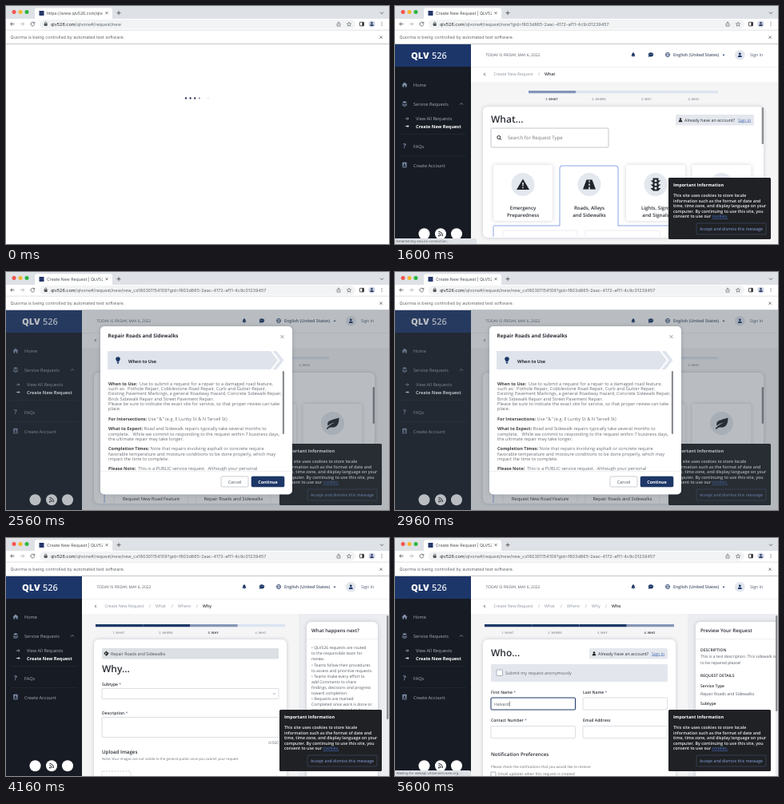
An HTML page with a canvas that plays this animation: 479 by 298 pixels, repeating every 5680 ms.

```html
<!DOCTYPE html>
<html lang="en">
<head>
<meta charset="utf-8">
<title>Create New Request</title>
<style>
html, body { margin: 0; width: 100%; height: 100%; overflow: hidden; background: #fff; }
canvas { display: block; width: 479px; height: 298px; }
</style>
</head>
<body>
<canvas id="stage"></canvas>
<script>
const canvas = document.getElementById('stage');
const ctx = canvas.getContext('2d');
const dpr = window.devicePixelRatio || 1;
canvas.width = 479 * dpr;
canvas.height = 298 * dpr;

const LOOP = 5680, STEP = 80;
const NAVY = '#1c3766', INK = '#2b2f36', GREY = '#6b7077', PALE = '#dfe4ec', BLUE = '#4a6cb3';
const UI = 'Inter, sans-serif', SITE = '"Open Sans", sans-serif';
const TYPE = 'Repair Roads and Sidewalks';

// Drawing helpers
function text(s, x, y, size, color = INK, weight = 400, align = 'left', family = SITE) {
  ctx.font = `${weight} ${size}px ${family}`;
  ctx.textAlign = align;
  ctx.fillStyle = color;
  ctx.fillText(s, x, y);
  return ctx.measureText(s).width;
}
function lines(list, x, y, pitch, size, color, weight) {
  list.forEach((s, i) => text(s, x, y + i * pitch, size, color, weight));
}
function box(x, y, w, h, r, fill, stroke, width = 0.6) {
  ctx.beginPath();
  ctx.roundRect(x, y, w, h, r);
  if (fill) { ctx.fillStyle = fill; ctx.fill(); }
  if (stroke) { ctx.strokeStyle = stroke; ctx.lineWidth = width; ctx.stroke(); }
}
function disc(x, y, r, fill) { box(x - r, y - r, 2 * r, 2 * r, r, fill); }
function path(d, x, y, fill, stroke, width = 0.8) {
  const p = new Path2D(d);
  ctx.save();
  ctx.translate(x, y);
  if (fill) { ctx.fillStyle = fill; ctx.fill(p, 'evenodd'); }
  if (stroke) { ctx.strokeStyle = stroke; ctx.lineWidth = width; ctx.stroke(p); }
  ctx.restore();
}
function card(x, y, w, h, r = 6) {
  ctx.save();
  ctx.shadowColor = 'rgba(40,50,70,.22)';
  ctx.shadowBlur = 5 * dpr;
  box(x, y, w, h, r, '#fff');
  ctx.restore();
}
function clipped(x, y, w, h, draw) {
  ctx.save();
  ctx.beginPath();
  ctx.rect(x, y, w, h);
  ctx.clip();
  draw();
  ctx.restore();
}
function underlined(s, x, y, size, color = BLUE) {
  const w = text(s, x, y, size, color);
  box(x, y + 0.8, w, 0.5, 0, color);
}
const cross = (x, y, r, c) => path(`M-${r}-${r}L${r} ${r}M${r}-${r}L-${r} ${r}`, x, y, null, c, 0.7);
function person(x, y, c, k = 1) {
  disc(x, y - 1.2 * k, 1.3 * k, c);
  box(x - 2.2 * k, y + 0.4 * k, 4.4 * k, 2.2 * k, [1.4 * k, 1.4 * k, 0, 0], c);
}
function button(s, x, y, w, h, fill, stroke, color, weight = 600) {
  box(x, y, w, h, 1.5, fill, stroke);
  text(s, x + w / 2, y + h / 2 + 2, 5.4, color, weight, 'center');
}

// Time helpers
const ramp = (t, a, b) => Math.min(1, Math.max(0, (t - a) / (b - a)));
const ease = k => k * k * (3 - 2 * k);
const typed = (s, t, a, b) => s.slice(0, Math.round(s.length * ramp(t, a, b)));

function browser(t) {
  box(0, 0, 479, 16, 0, '#dee1e6');
  ['#f4554d', '#f5b52e', '#2bb640'].forEach((c, i) => disc(10 + 8 * i, 7.5, 2.5, c));
  box(36, 2.5, 97, 14, [3, 3, 0, 0], '#fff');
  box(41.5, 6, 6, 6, 0, '#25376b');
  const title = t < 800 ? 'https://www.qlv526.com/qlvone' : 'Create New Request | QLV526';
  clipped(50, 3, 71, 12, () => text(title, 51, 10.7, 5.2, '#45494d', 400, 'left', UI));
  cross(126, 8.7, 1.5, '#444');
  path('M-2.5 0H2.5M0-2.5V2.5', 141, 8.7, null, '#444');
  path('M-2-1L0 1L2-1', 470, 8.7, null, '#444');

  box(0, 16, 479, 32, 0, '#fff');
  path('M2.5 0H-2.3M0-2.3L-2.3 0L0 2.3', 8, 22.5, null, '#55595e');
  path('M-2.5 0H2.3M0-2.3L2.3 0L0 2.3', 20.5, 22.5, null, '#b0b3b7');
  path('M2 -1.3A2.4 2.4 0 1 0 2.4 .5M2.5-2.7V-.8H.6', 33.3, 22.5, null, '#55595e');
  box(42, 17, 395, 11.5, 5.7, '#f1f3f4');
  box(47.7, 21.8, 4, 3.2, 0.4, '#55595e');
  path('M-1.1 0V-1A1.1 1.1 0 0 1 1.1-1V0', 49.7, 22, null, '#55595e', 0.7);
  let route = '/qlvone#/request/new';
  if (t >= 2240) route += '/new_cs180301154109';
  if (t >= 800) route += '?gid=f803d865-2aac-4172-af11-4c9c01239457';
  const host = text('qlv526.com', 56, 24.5, 5.5, '#25282c', 400, 'left', UI);
  text(route, 56 + host, 24.5, 5.5, '#63676c', 400, 'left', UI);
  path('M-1.2-.8H-2V2.5H2V-.8H1.2M0 1V-2.8M-1.2-1.6L0-2.8L1.2-1.6', 416, 22.7, null, '#55595e', 0.6);
  path('M0-2.7L.8-.9L2.7-.8L1.2.5L1.7 2.4L0 1.3L-1.7 2.4L-1.2.5L-2.7-.8L-.8-.9Z', 429, 22.8, null, '#55595e', 0.6);
  box(442.5, 20.3, 5, 4.6, 0.3, null, '#333', 0.8);
  box(445.3, 20.3, 2.2, 4.6, 0, '#333');
  disc(457.5, 22.5, 4, '#cdd3e6');
  person(457.5, 22.5, '#334263');
  [-2, 0, 2].forEach(d => disc(470, 22.5 + d, 0.6, '#55595e'));
  box(0, 29.7, 479, 0.7, 0, '#d5d7da');
  text('Quorma is being controlled by automated test software.', 5.5, 41.3, 5.45, '#63676c', 400, 'left', UI);
  cross(469, 39.2, 1.6, '#444');
  box(0, 47, 479, 1, 0, '#c3c5c8');
}

function loader(t) {
  for (let i = 0; i < 6; i++) {
    const wave = Math.cos(2 * Math.PI * ((i - 1.2) / 6 - t / 640));
    ctx.globalAlpha = Math.min(1, Math.max(0, 0.75 + wave));
    disc(225 + 5.6 * i, 115.5, 1.15, '#1d2350');
  }
  ctx.globalAlpha = 1;
}

function sidebar() {
  const soft = '#a3acb9', dark = '#171c24';
  box(0, 48, 95, 250, 0, dark);
  box(0, 48, 95, 28, 0, '#1d366a');
  text('QLV', 20, 66, 11, '#fff', 800);
  text('526', 46, 66, 11, '#e4e9f2', 600);
  path('M-3.5 .3L0-3L3.5 .3L2.6 .3V3H.8V1H-.8V3H-2.6V.3Z', 12, 98.5, '#8190ab');
  text('Home', 23, 100.7, 5.6, soft);
  path('M-3-1.6L0-3L3-1.6L0-.2ZM-3 .1L0 1.5L3 .1V1L0 2.4L-3 1ZM-3 1.8L0 3.2L3 1.8V2.5L0 4L-3 2.5Z', 12, 122, '#8190ab');
  text('Service Requests', 23, 124.7, 5.6, soft);
  path('M-2 1L0-1L2 1', 83, 122.5, null, soft, 0.7);
  [[141, soft], [150.5, '#fff']].forEach(([y, c]) => path('M-2 0H2M.5-1.5L2 0L.5 1.5', 15, y, null, c));
  text('View All Requests', 26, 143, 5.6, soft);
  text('Create New Request', 26, 152.5, 5.6, '#fff', 700);
  box(6, 160.5, 83, 0.5, 0, '#2a303a');
  text('?', 12, 178.3, 8, '#8190ab', 700, 'center');
  text('FAQs', 23, 177.5, 5.6, soft);
  box(6, 187, 83, 0.5, 0, '#2a303a');
  box(9.3, 195.7, 5.2, 6.6, 0.6, '#8190ab');
  person(11.9, 199.2, dark, 0.8);
  text('Create Account', 23, 201.5, 5.6, soft);
  [36.5, 57, 77].forEach(x => disc(x, 285.3, 7, '#fff'));
  disc(55, 287.5, 0.9, dark);
  path('M-2-.6A2.8 2.8 0 0 1 .8 2.8M-2-2.8A5 5 0 0 1 3 2.8', 56.4, 285.2, null, dark, 1);
}

function header(crumbs) {
  box(95, 48, 384, 47, 0, '#fff');
  box(95, 76, 384, 0.6, 0, '#e4e6ea');
  text('TODAY IS FRIDAY, MAY 6, 2022', 113.5, 63.2, 4.9, '#555b64');
  path('M-2.6 1.8C-1.4 .6-2-2.6 0-2.8C2-2.6 1.4 .6 2.6 1.8ZM-.8 2.3H.8L0 3.2Z', 298, 61, NAVY);
  path('M-3.2-.3A3.2 2.6 0 1 1-1.2 2.2L-3.2 3L-2.6 1.3Z', 320, 61, NAVY);
  [-1.4, 0, 1.4].forEach(d => disc(320 + d, 60.7, 0.4, '#fff'));
  path('M-2.7 0A2.7 2.7 0 1 0 2.7 0A2.7 2.7 0 1 0-2.7 0M-2.7 0H2.7M0-2.7C-1.8-1-1.8 1 0 2.7C1.8 1 1.8-1 0-2.7', 341, 61, null, NAVY, 0.6);
  text('English (United States)', 348, 63.2, 5.3, '#46536a', 600);
  path('M-1.5-.7H1.5L0 1Z', 411, 61.5, NAVY);
  disc(431.3, 61.3, 6.3, '#e2e6ee');
  person(431.3, 61.2, NAVY, 1.1);
  text('Sign In', 444, 63.2, 5.2, '#46536a');
  path('M.8-1.6L-.8 0L.8 1.6', 112, 85.5, null, '#333');
  const starts = [123.5, 187, 215, 246, 271];
  ['Create New Request', 'What', 'Where', 'Why', 'Who'].slice(0, crumbs).forEach((s, i) => {
    const last = i === crumbs - 1;
    text(s, starts[i], 87.3, 5.2, last ? INK : '#8b929c', last ? 600 : 400);
    if (!last) text('/', starts[i + 1] - 8, 87.3, 5.2, '#8b929c');
  });
}

function progress(x, y, current) {
  const w = 59.25;
  ['1. WHAT', '2. WHERE', '3. WHY', '4. WHO'].forEach((s, i) => {
    box(x + i * w, y, w, 3.2, 0, i < current ? NAVY : i === current ? '#8495b7' : '#dce4ef');
    text(s, x + (i + 0.5) * w - 1, y + 11.5, 3.9, i === current ? INK : GREY, i === current ? 600 : 400, 'center');
  });
}

const heading = (s, y) => text(s, 120, y, 12, INK, 600);

function account(x, y) {
  box(x, y, 98, 13.5, 1.5, '#e4e7ed');
  person(x + 6, y + 6.7, '#222');
  text('Already have an account?', x + 11, y + 8.7, 5.35, INK);
  underlined('Sign In', x + 78, y + 8.7, 5.2);
}

function typeTag(x, y, w) {
  box(x, y, w, 13.5, 1.5, '#dcdfe4');
  path('M0-3.2L3.2 0L0 3.2L-3.2 0Z', x + 5.5, y + 6.6, '#222');
  path('M-1 1.2V-.4H1', x + 5.5, y + 6.6, null, '#fff', 0.7);
  text(TYPE, x + 11, y + 8.6, 5.25, '#444b55');
}

const categories = [
  [160, 'Emergency', 'Preparedness', 'M0-7L8 6.5H-8ZM-.9-2.4H.9L.5 2.2H-.5ZM-.8 3.2H.8V4.8H-.8Z'],
  [243, 'Roads, Alleys', 'and Sidewalks', 'M-3.5-6H3.5L8 6H-8ZM-.6-5H.6V-2.5H-.6ZM-.7-1H.7V1.5H-.7ZM-.8 3H.8V6H-.8Z'],
  [326, 'Lights, Signs', 'and Signals', 'M-3.5-8H3.5L3.5-5H6.5L3.5-2.5V0H6.5L3.5 2.5V4.5H6.5L3 8H-3L-6.5 4.5H-3.5V2.5L-6.5 0H-3.5V-2.5L-6.5-5H-3.5ZM-1.4-6H1.4V-3.2H-1.4ZM-1.4-1.4H1.4V1.4H-1.4ZM-1.4 3.2H1.4V6H-1.4Z'],
  [408.5, '', '', 'M8-7C8 3 4 5.5-2 5L-4 5.3L-6.8 7.5L-7.8 6.5C-5 3-2 1 3-1C-2 0-4 1.5-6 3C-8-4-1-4 8-7Z']
];

function whatPage(t) {
  header(2);
  progress(167, 106, 0);
  const open = t >= 1440, scroll = 34 * ease(ramp(t, 1760, 2080));
  card(110, 126, 351, 164);
  clipped(110, 126, 351, 163, () => {
    ctx.translate(0, -scroll);
    heading('What...', 146.3);
    account(351, 136);
    box(120, 153, 147, 24, 1.5, '#fff', '#9da2ab');
    path('M-2.2 0A2 2 0 1 0 1.8 0A2 2 0 1 0-2.2 0M1.2 1.4L3 3.2', 130, 164.5, null, '#222', 1);
    text('Search for Request Type', 141, 167.2, 6.1, '#777');
    if (open) {
      box(123, 275, 323, 90, 1.5, '#fff', '#6f8ee0', 0.8);
      ['Request New Road Feature', TYPE, ''].forEach((s, i) => {
        const x = 135 + 103 * i;
        box(x, 281, 93, 47, 1.5, '#fff', '#d9dde4');
        disc(x + 46.5, 303, 10, '#e8ecf1');
        text(s, x + 46.5, 319.8, 5.7, INK, 400, 'center');
      });
    }
    categories.forEach(([x, top, bottom, icon], i) => {
      if (open && i === 1) {
        box(x - 37, 200, 73, 76, [3, 3, 0, 0], '#fff');
        path('M0 75.3V3Q0 0 3 0H70Q73 0 73 3V75.3', x - 37, 200, null, '#6f8ee0');
      } else card(x - 37, 199, 74, 70, 2);
      disc(x, 223.5, 14.5, '#e3e7ee');
      path(icon, x, 223.5, '#20242a');
      text(top, x, 255, 6.1, INK, 600, 'center');
      text(bottom, x, 263.5, 6.1, INK, 600, 'center');
    });
  });
  box(458.7, 127 + scroll * 0.5, 2.3, 46, 1, '#8a8d91');
}

const help = [
  [0, 'When to Use:', '  Use to submit a request for a repair to a damaged road feature,'],
  [1, '', 'such as:  Pothole Repair, Cobblestone Road Repair, Curb and Gutter Repair,'],
  [2, '', 'Existing Pavement Markings, a general Roadway Hazard, Concrete Sidewalk Repair,'],
  [3, '', 'Brick Sidewalk Repair and Street Pavement Repair.'],
  [4, '', 'Please be sure to indicate the exact site for service, so that proper review can take'],
  [5, '', 'place.'],
  [7, 'For Intersections:', ' Use "&" (e.g. E Lunby St & N Tarvell St)'],
  [9, 'What to Expect:', ' Road and Sidewalk repairs typically take several months to'],
  [10, '', 'complete.   While we commit to responding to the request within 7 business days,'],
  [11, '', 'the ultimate repair may take longer.'],
  [13, 'Completion Times:', ' Note that repairs involving asphalt or concrete require'],
  [14, '', 'favorable temperature and moisture conditions to be done properly, which may'],
  [15, '', 'impact the time to complete.'],
  [17, 'Please Note:', '  This is a PUBLIC service request.  Although your personal']
];

function modal() {
  ctx.fillStyle = 'rgba(55,68,78,.35)';
  ctx.fillRect(0, 48, 479, 250);
  card(118, 68, 240, 210.5, 5);
  text(TYPE, 127.5, 82, 6.35, INK, 700);
  cross(345.5, 81, 2, '#777');
  path('M0 0H204L213 11.5L204 23H0Z', 127, 99, PALE);
  path('M206.5 0H211.5L220.5 11.5L211.5 23H206.5L215.5 11.5Z', 127, 99, PALE);
  path('M-1.3 2C-1.3 .8-2.8 .2-2.8-1.4A2.8 2.8 0 0 1 2.8-1.4C2.8 .2 1.3 .8 1.3 2ZM-1.2 2.6H1.2V3.6L0 4.5L-1.2 3.6Z', 140, 110.5, NAVY);
  text('When to Use', 153, 113.6, 5.6, INK, 700);
  clipped(118, 124, 240, 125, () => help.forEach(([row, strong, rest]) => {
    const y = 141.8 + row * 6.27;
    const w = strong ? text(strong, 128, y, 5.5, '#444', 700) : 0;
    text(rest, 128 + w, y, 5.65, '#6a6f76');
  }));
  box(345.8, 124, 2.2, 79, 1, '#8a8d91');
  box(118, 249.5, 240, 0.6, 0, '#dcdfe4');
  button('Cancel', 269, 256, 34, 13, '#fff', '#a4abb8', '#4c5564', 400);
  button('Continue', 307, 256, 41, 13, NAVY, NAVY, '#fff', 700);
}

function wherePage() {
  header(3);
  card(110, 105, 134, 126);
  typeTag(120, 115, 114.5);
  heading('Where...', 145.4);
  lines(['Click on the map to place a pin or search by the', 'closest address to the request location.'], 120, 154.8, 7, 4.85, GREY);
  box(120, 170, 114.5, 16, 1.5, '#fff', '#cfd3d9');
  path('M0 3C-2.6 0-2-2.8 0-2.8C2-2.8 2.6 0 0 3ZM-.8-.8H.8V.6H-.8Z', 127, 178, '#222');
  text('Start new or search existing...', 135.5, 180, 5.15, '#9a9ea4');
  underlined('Use my current location', 120, 198.2, 5.15);
  button('Search', 199, 190, 35.5, 13, '#fff', '#94a0b8', '#3c465a');
  button('Back', 158, 209, 31.5, 13, '#fff', '#94a0b8', '#3c465a');
  button('Continue', 193, 209, 41.5, 13, '#e2e3e5', null, '#b3b6bb', 400);
}

function label(s, x, y, required = true) {
  const w = text(s, x, y, 5.1, INK, 600);
  if (required) text(' *', x + w, y, 5.1, '#6d7da0', 600);
}
function select(name, y, value, focus) {
  label(name, 120, y);
  box(120, y + 3.5, 221, 13, 1, '#fff', focus ? NAVY : '#c3c8d0', focus ? 0.9 : 0.6);
  text(value, 123.5, y + 12, 5.4, '#666b72');
  path('M-1.8-.9L0 .9L1.8-.9', 335.5, y + 10, null, '#777', 0.6);
}

const nextSteps = ['• QLV526 requests are routed', 'to the responsible team for', 'review.',
  '• Teams follow their procedures', 'to assess and prioritize requests.',
  '• Teams make every effort to', 'add Comments to share', 'findings, decisions and progress', 'toward completion.',
  '• Requests are marked', 'Completed once work is done or', 'request is determined to be a',
  'duplicate of another request.', 'The responsible team will add'];

function whyPage(t) {
  const chosen = t >= 4240;
  const scroll = 17.5 * ease(ramp(t, 4480, 4640)) + 110 * ease(ramp(t, 4800, 4960));
  header(4);
  clipped(95, 95, 384, 203, () => {
    box(366, 95, 113, 203, 0, '#ecedf0');
    ctx.translate(0, -scroll);
    progress(112, 108, 2);
    card(110, 127, 241, 330);
    typeTag(120, 138, 221);
    heading('Why...', 167.5);
    select('Subtype', 185, chosen ? 'Brick Sidewalk Repair' : '');
    if (chosen) {
      select('Immediate Danger to Person or Property', 220.5, t >= 4400 ? 'No' : '');
      select('Damage Caused by Tree Roots', 256.5, t >= 4560 ? 'No' : '');
      text('Issues involving tree roots may require us to consult with the Urban Forestry team.', 120, 281, 4.3, GREY);
      select('Handicap Ramp Present', 300.5, t >= 4800 ? 'No' : '', t >= 4640 && t < 4880);
    }
    const y = chosen ? 336.5 : 221;
    const note = typed('This is a test description. This sidewalk is to be repaired please!', t, 4880, 5200);
    label('Description', 120, y);
    box(120, y + 3.5, 221, 25, 1, '#fff', note ? NAVY : '#c3c8d0');
    text(note, 123.5, y + 12, 5.2, '#555');
    text(note.length + '/500', 341, y + 37, 4.8, GREY, 400, 'right');
    text('Upload Images', 120, y + 49, 6.2, INK, 600);
    text('Note: Your images are not visible to the general public once you submit your request', 120, y + 57, 4.35, GREY);
    ctx.setLineDash([2, 1.5]);
    box(120, y + 71, 36, 30, 1.5, '#fff', '#aab0b9');
    ctx.setLineDash([]);
    card(376, 105, 89, 240);
    text('What happens next?', 382, 118, 6.1, INK, 600);
    box(376, 126, 89, 0.6, 0, '#dfe2e7');
    lines(nextSteps, 382, 139.2, 7.1, 5, '#555b64');
  });
  box(476, 97 + scroll * 0.4, 2.4, chosen ? 92 : 130, 1, '#8a8d91');
}

function whoPage(t) {
  header(5);
  box(366, 95, 113, 203, 0, '#ecedf0');
  progress(112, 108, 3);
  card(110, 127, 241, 190);
  heading('Who...', 148);
  account(243, 138);
  box(120, 158, 221, 22, 1.5, '#e3e6ed');
  box(127, 165, 7.5, 7.5, 1, '#fff', '#7b8494');
  text('Submit my request anonymously', 138, 170.7, 5.4, '#5c626c');
  const field = (name, x, y, required, focus) => {
    label(name, x, y - 5.5, required);
    box(x, y, 105.5, 15, 1, '#fff', focus ? NAVY : '#c3c8d0', focus ? 1 : 0.6);
  };
  field('First Name', 120, 200, true, true);
  field('Last Name', 235, 200, true);
  field('Contact Number', 120, 235.5, true);
  field('Email Address', 235, 235.5, false);
  const w = text(typed('Halvard', t, 5280, 5600), 124, 209.6, 5.2, '#555');
  box(124.3 + w, 204.5, 0.5, 6.5, 0, '#333');
  text('Notification Preferences', 120, 273, 6.2, INK, 600);
  text('Please check the notifications that you would like to receive:', 120, 287.5, 4.5, GREY);
  box(120, 293, 6, 6, 1, '#fff', '#7b8494');
  text('Email updates when this request is created', 129, 297.3, 4.8, GREY);
  clipped(366, 95, 110, 203, () => {
    card(376, 105, 140, 220);
    text('Preview Your Request', 382, 118, 6.2, INK, 600);
    box(376, 126, 120, 0.6, 0, '#dfe2e7');
    text('DESCRIPTION', 382, 142, 5, INK, 600);
    lines(['This is a test description. This sidewalk is', 'to be repaired please!'], 382, 150.3, 7.2, 5, '#555b64');
    text('REQUEST DETAILS', 382, 174.3, 5, INK, 600);
    text('Service Type', 382, 186.7, 5, INK, 600);
    text(TYPE, 382, 196.5, 5.2, '#555b64');
    text('Subtype', 382, 208.7, 5, INK, 600);
  });
  box(476, 97, 2.4, 120, 1, '#8a8d91');
}

function cookies() {
  box(342, 215, 128, 77, 1.5, '#1f2124');
  text('Important Information', 348, 226.3, 5.5, '#fff', 700);
  lines(['This site uses cookies to store locale', 'information such as the format of date and',
    'time, time zone, and display language on your', 'computer. By continuing to use this site, you'],
    348, 239.3, 6.5, 5.25, '#f0f1f3', 600);
  const w = text('consent to use our ', 348, 265.3, 5.25, '#f0f1f3', 600);
  underlined('cookies.', 348 + w, 265.3, 5.25, '#4f7de0');
  box(377, 272, 87, 14, 1, null, '#46536f');
  text('Accept and dismiss this message', 420.5, 280.9, 5.2, '#8fabef', 400, 'center');
}

function status(s, width) {
  box(0, 291, width, 7, [0, 2, 0, 0], '#dee1e6');
  text(s, 1.5, 296.2, 4.3, '#5a5e63', 400, 'left', UI);
}

function render(t) {
  ctx.setTransform(dpr, 0, 0, dpr, 0, 0);
  ctx.textRendering = 'geometricPrecision';
  ctx.fillStyle = '#fff';
  ctx.fillRect(0, 0, 479, 298);
  if (t < 800) loader(t);
  else {
    box(95, 95, 384, 203, 0, '#f5f5f6');
    if (t < 3040) whatPage(t);
    else if (t < 3920) wherePage();
    else if (t < 5280) whyPage(t);
    else whoPage(t);
    sidebar();
    cookies();
    if (t >= 2240 && t < 3040) modal();
    if (t >= 1440 && t < 1680) status('Establishing secure connection...', 102);
    if (t >= 5280) status('Waiting for webapi.citizenservices.org...', 95);
  }
  browser(t);
}

function tick(now) {
  render(Math.floor((now % LOOP) / STEP) * STEP);
  requestAnimationFrame(tick);
}
requestAnimationFrame(tick);
</script>
</body>
</html>
```
